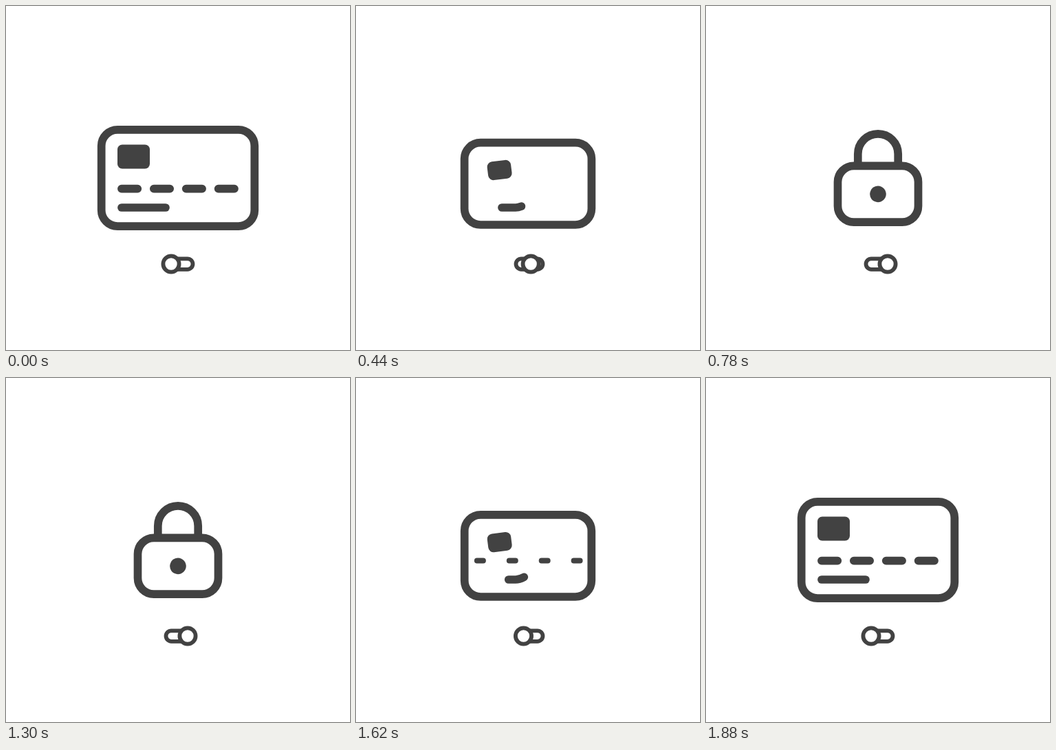
Animation of 500 by 500 pixels, one loop 2.1 s. Source, as an HTML page:

```html
<!DOCTYPE html>
<html lang="en">
<head>
<meta charset="utf-8">
<title>Card lock toggle</title>
<style>
  html, body { margin: 0; width: 100%; height: 100%; overflow: hidden; background: #fff; }
  svg { display: block; width: 100%; height: 100%; }
</style>
</head>
<body>
<svg viewBox="0 0 500 500" fill="none" stroke="#424242" stroke-width="11.7" stroke-linecap="round">
  <path id="line"/>
  <path id="dashes"/>
  <rect id="chip" fill="#424242" stroke="none"/>
  <rect id="body" rx="23.4"/>
  <g stroke-width="5.8">
    <rect x="232.5" y="367.3" width="39" height="15.5" rx="7.75"/>
    <circle id="knob" cy="375" r="11.6" fill="#fff"/>
  </g>
</svg>
<script>
const LOOP = 2100;
const $ = id => document.getElementById(id);
const set = (id, attrs) => {
  for (const k in attrs) $(id).setAttribute(k, attrs[k]);
};
const mix = (a, b, p) => a + (b - a) * p;

// Cubic bezier easing with handles (a, 0) and (b, 1)
function ease(x, a, b) {
  if (x <= 0) return 0;
  if (x >= 1) return 1;
  let lo = 0, hi = 1, s;
  for (let i = 0; i < 30; i++) {
    s = (lo + hi) / 2;
    const r = 1 - s;
    if (3 * r * r * s * a + 3 * r * s * s * b + s * s * s < x) lo = s;
    else hi = s;
  }
  return s * s * (3 - 2 * s);
}

// 0 = card, 1 = lock: there during [t0, t1], back during [t2, t3]
const phase = (t, [t0, t1, t2, t3], a = 0.75, b = 0.25) =>
  ease((t - t0) / (t1 - t0), a, b) - ease((t - t2) / (t3 - t2), a, b);

function drawBody(p) {
  const half = mix(111.3, 58.5, p);
  const top = mix(179.9, 232.4, p);
  set("body", { x: 250 - half, y: top, width: 2 * half, height: mix(320.1, 314.2, p) - top });
}

function drawChip(p) {
  const dip = 17 * p * (1 - p);
  const w = mix(47, 23.5, p) - dip;
  const h = mix(35, 23.5, p) - dip;
  const x = mix(185.5, 250, p), y = mix(219, 273.4, p);
  set("chip", {
    x: -w / 2, y: -h / 2, width: w, height: h, rx: 7 + 4.75 * p * p,
    transform: `translate(${x} ${y}) rotate(${-20 * p})`
  });
}

function drawDashes(p) {
  const q = 1 - p;
  const len = 23.4 * q;
  let d = "";
  for (let i = 0; i < 4; i++) d += `M${179.6 + 46.9 * i + 1.3 * p - len / 2} 265.6h${len}`;
  set("dashes", { d, "stroke-width": 11.7 * q ** 0.4, visibility: q > 0.01 ? "visible" : "hidden" });
}

// The short line slides along a path that ends in the shackle
function drawLine(p, tail, head) {
  const grow = Math.min(1, 36 * (1 - p));
  const r = 29.2 + grow;
  const y = 215 + 2 * grow;
  const right = 250 + r;
  const d = `M168 293H232C250 293 ${right} 262 ${right} 230V${y}A${r} ${r} 0 0 0 ${250 - r} ${y}V230`;
  set("line", { d });
  const total = $("line").getTotalLength();
  const arch = Math.PI * r + 2 * (230 - y);
  const from = (total - arch) * tail;
  const to = mix(64, total, head);
  set("line", { "stroke-dasharray": `${to - from} 2000`, "stroke-dashoffset": -from });
}

function draw(t) {
  const p = phase(t, [180, 745, 1320, 1880]);
  drawBody(p);
  drawChip(p);
  drawDashes(phase(t, [235, 435, 1480, 1780]));
  drawLine(p, phase(t, [190, 760, 1320, 1880]), phase(t, [365, 700, 1375, 1710]));
  set("knob", { cx: 240 + 24 * phase(t, [180, 780, 1280, 1880], 0.67, 0.1) });
}

const start = performance.now();
function tick() {
  draw((performance.now() - start) % LOOP);
  requestAnimationFrame(tick);
}
tick();
</script>
</body>
</html>
```
